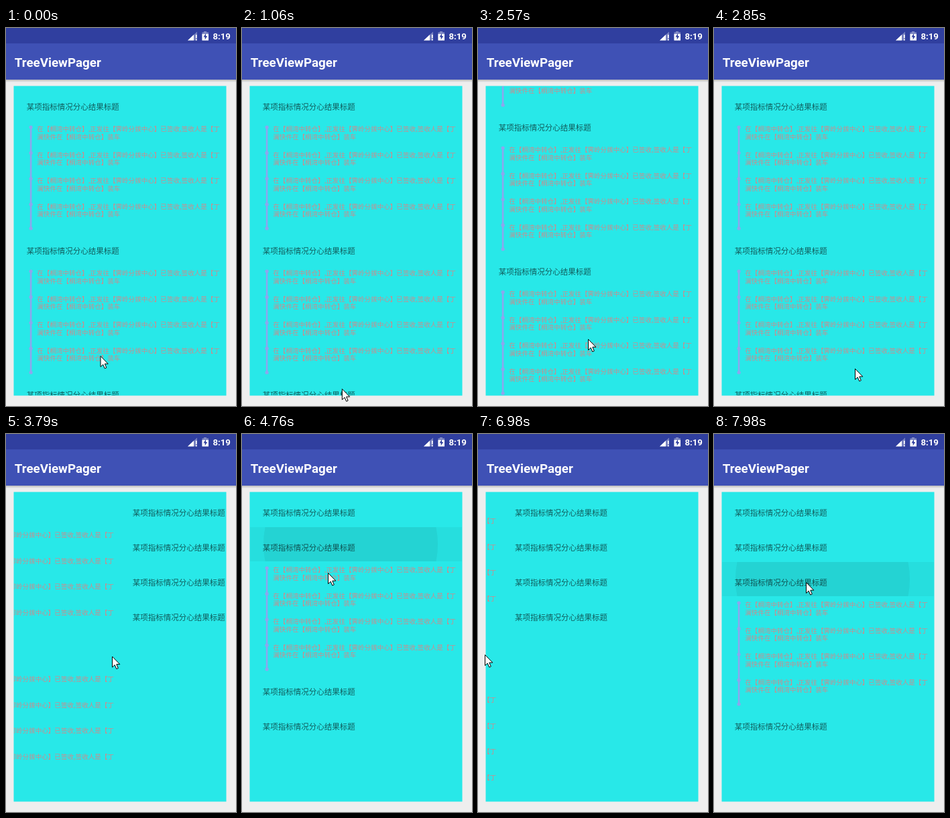
Write an HTML page that moves like this. It is 343 px wide and 564 px high and loops after 8000 ms.

```html
<!DOCTYPE html>
<html lang="zh-CN">
<head>
<meta charset="utf-8">
<title>TreeViewPager</title>
<style>
html, body { margin: 0; height: 100%; overflow: hidden; background: #eee; }
#stage { display: block; width: 100vw; height: 100vh; }
.bar { font-family: Roboto, sans-serif; font-weight: 600; fill: #fff; }
.title, .detail { font-family: "Noto Sans CJK SC", "Noto Sans CJK", sans-serif; }
.title { font-size: 11.5px; fill: rgba(0, 0, 0, .6); }
.detail { font-size: 9.55px; fill: #cb8c8d; }
</style>
</head>
<body>
<svg id="stage" viewBox="0 0 343 564">
  <defs>
    <linearGradient id="shade" x2="0" y2="1">
      <stop stop-opacity=".28"/><stop offset="1" stop-opacity="0"/>
    </linearGradient>
    <g id="child"></g>
  </defs>
  <rect width="343" height="564" fill="#eee"/>
  <rect y="76" width="343" height="5" fill="url(#shade)"/>
  <rect width="343" height="77" fill="#3f51b5"/>
  <rect width="343" height="23" fill="#303f9f"/>
  <g fill="#fff">
    <path d="M271 18.5L285 5.5V18.5Z" opacity=".35"/>
    <path d="M271 18.5L280 10V18.5Z"/>
    <path d="M283 10h1.6v5H283zM283 16.5h1.6v2H283z"/>
    <path d="M295 5h4v1.5h3V18.5H292.5V6.5H295z" opacity=".4"/>
    <path d="M292.5 9H302V18.5H292.5z"/>
    <path d="M298 8l-3.5 5.5h2.2V17.5l3.5-5.5h-2.2z" fill="#303f9f"/>
  </g>
  <text class="bar" x="308.5" y="17" font-size="13.2">8:19</text>
  <text class="bar" x="12.7" y="58" font-size="18.8">TreeViewPager</text>
  <rect x="11.5" y="86.5" width="317" height="462" fill="#28e8e8"/>
  <svg id="card" x="12" y="87" width="316" height="461"></svg>
  <path id="cursor" d="M0 0V16L3.7 12.6L6.3 18.5L8.8 17.4L6.3 11.6H11.3Z" fill="#fff" stroke="#000"/>
</svg>
<script>
const LOOP = 8000, STEP = 133, PAGE_W = 316, ROW = 52, CHILD = 163;
const $ = id => document.getElementById(id);

function add(parent, tag, attrs = {}, text = '') {
  const el = document.createElementNS('http://www.w3.org/2000/svg', tag);
  for (const k in attrs) el.setAttribute(k, attrs[k]);
  el.textContent = text;
  return parent.appendChild(el);
}
const move = (el, x, y) => el.setAttribute('transform', `translate(${x} ${y})`);

const ramp = (t, a, b) =>
  Math.max(0, Math.min(1, Math.floor((t - a) / STEP) * STEP / (b - a)));

// Timeline block shown below an expanded heading
const child = $('child');
const dot = y => add(child, 'circle', { cx: 25.1, cy: y, r: 2.6, fill: '#8da6ee' });
const line = (y, text) => add(child, 'text', { class: 'detail', x: 34.3, y }, text);
add(child, 'rect', { x: 23.8, y: 59, width: 2.6, height: 153, fill: '#8da6ee' });
for (let i = 0; i < 4; i++) {
  const y = 61 + i * 38.4;
  dot(y);
  line(y + 6.3, '在【桐湾中转仓】,正发往【霁岭分拨中心】已签收,签收人是【丁');
  line(y + 17.7, '澜快件在【桐湾中转仓】装车');
}
dot(212);

function addGroup(page, open = Infinity) {
  const g = add(page, 'g');
  const ripple = add(g, 'svg', { width: PAGE_W, height: 51 });
  add(ripple, 'rect', { width: PAGE_W, height: 51, opacity: .045 });
  add(ripple, 'circle', { cx: 150, cy: 25.5, r: 130, opacity: .05 });
  add(g, 'text', { class: 'title', x: 18.8, y: 34.9 }, '某项指标情况分心结果标题');
  return { g, open, ripple, body: add(g, 'use', { href: '#child' }) };
}

// When each page's headings open; a missing entry stays closed
const pages = [[-LOOP, -LOOP, -LOOP, -LOOP], [, 4760, , 5860], [, , 7980, ,]].map(opens => {
  const el = add($('card'), 'g');
  return { el, groups: [0, 1, 2, 3].map(i => addGroup(el, opens[i])) };
});

const pagerAt = t => ramp(t, 3510, 4042) + ramp(t, 6580, 7012);
const scrolls = [
  t => 399 * (ramp(t, 1370, 1914) - ramp(t, 2450, 2849)),
  t => 73 * ramp(t, 5860, 6126),
  () => 0];

// Cursor gestures: start, end, destination
const gestures = [
  [150, 1060, 150, 545], [1370, 2310, 164, 464], [2450, 2849, 210, 508],
  [3110, 3509, 316, 335], [3510, 4042, 0, 328], [4080, 4479, 128, 207],
  [4893, 5710, 123, 437], [6180, 6579, 316, 340], [6580, 6979, 10, 329],
  [7100, 7670, 137, 221]];

function cursorAt(t) {
  let x = 140.5, y = 489;
  for (const [a, b, toX, toY] of gestures) {
    const u = ramp(t, a, b);
    x += (toX - x) * u;
    y += (toY - y) * u;
  }
  return [x + .5, y + .5];
}

function draw(t) {
  const pos = pagerAt(t);
  pages.forEach(({ el, groups }, i) => {
    move(el, (i - pos) * PAGE_W, -scrolls[i](t));
    let y = 0;
    for (const { g, open, ripple, body } of groups) {
      const isOpen = t >= open;
      move(g, 0, y);
      body.style.display = isOpen ? '' : 'none';
      ripple.style.opacity = isOpen ? 1 - ramp(t, open, open + 2 * STEP) : 0;
      y += ROW + (isOpen ? CHILD : 0);
    }
  });
  move($('cursor'), ...cursorAt(t));
}

let start;
function tick(now) {
  start ??= now;
  draw((now - start) % LOOP);
  requestAnimationFrame(tick);
}
draw(0);
requestAnimationFrame(tick);
</script>
</body>
</html>
```
